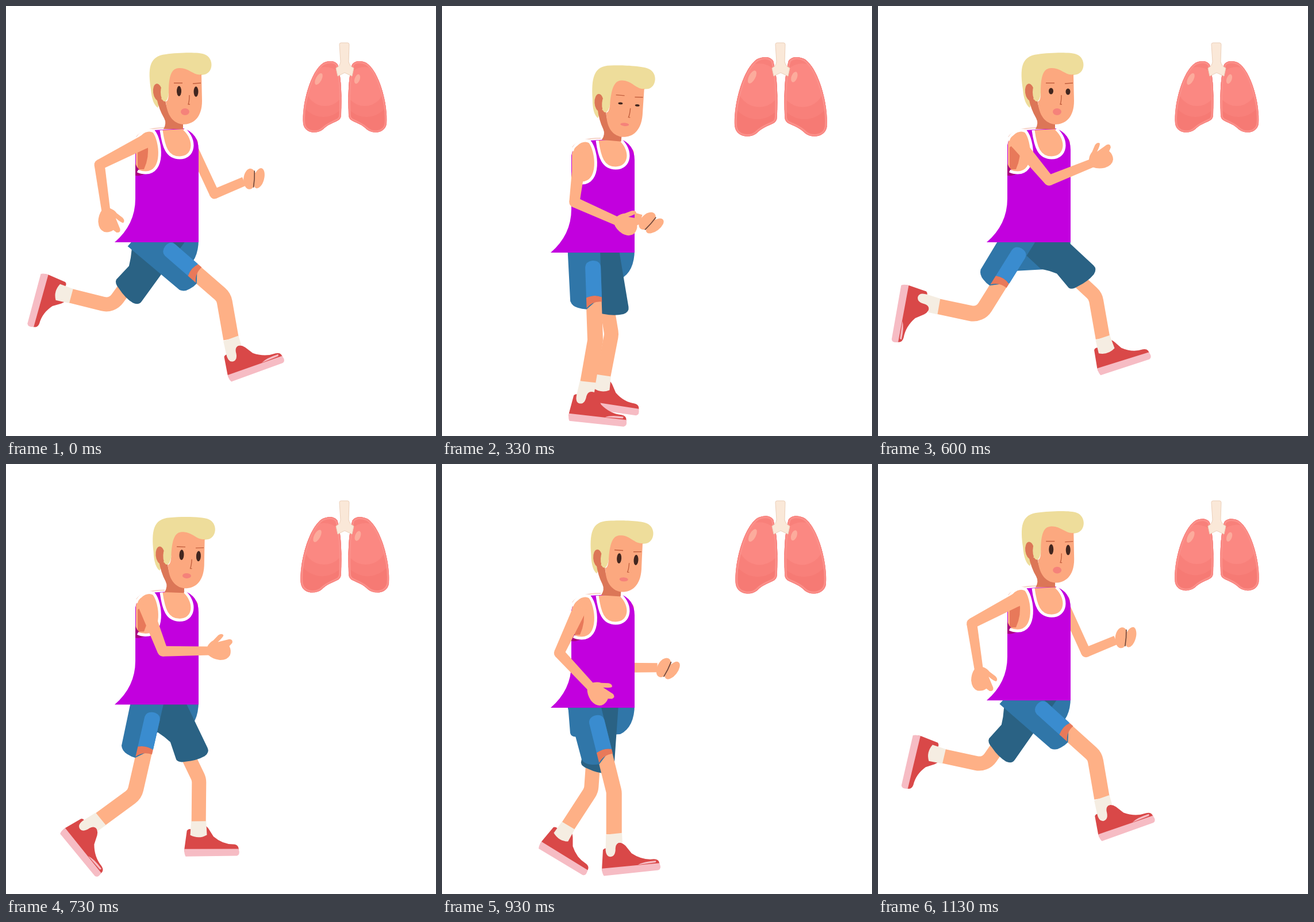
Recreate the animation shown at these times as an HTML page with a canvas. Size 748x748 px, loop 1.19 s.

```html
<!DOCTYPE html>
<html lang="en">
<head>
<meta charset="utf-8">
<title>Runner and lungs</title>
<style>
html, body { margin: 0; width: 100%; height: 100%; overflow: hidden; background: #fff; }
canvas { display: block; width: 100vw; height: 100vh; }
</style>
</head>
<body>
<canvas id="stage" width="748" height="748"></canvas>
<script>
const ctx = document.getElementById('stage').getContext('2d');
const LOOP = 1190, STEPS = 18, RAD = Math.PI / 180;

const C = {
  skin: '#feb086', face: '#fca87f', shade: '#dc7657', inner: '#e8795a', hair: '#eedd9b',
  shirt: '#c200de', fold: '#a8007f', mid: '#3076a8', light: '#3a8ccf', dark: '#2a6284',
  shoe: '#d94848', sole: '#f6bcc4', sock: '#f5ede2', eye: '#41261f', brow: '#c2603f',
  lip: '#f5827a', lung: '#fb8882', lungLow: '#f67a74', rim: '#fb908a', shine: '#fcab9c',
  pipe: '#fae8d8', pipeEdge: '#ecd0ba'
};

// Stride position: 0 = near leg fully forward, 9 = fully back.
const strideAt = [[0, 0], [9, 9], [11, 6.75], [14, 3.86], [17, 0.1], [18, 0]];
const eyeAt = [[0, 9], [2, 6], [4, 2], [7, 1.5], [9, 5.5], [11, 9], [18, 9]];

// Angles in degrees from straight down, positive towards the front.
const KEYS = [0, 2, 3.86, 5, 7, 9];
const POSE = {
  bob: [0, 5, 13, 18, 6, 0],
  near: {
    thigh: [49, 30, 14, 2, -15, -32],
    reach: [156, 159, 158, 160, 168, 158],
    shin: [10, 4, 0, -10, -60, -102],
    foot: [-20, -11.5, -6, 6, 57, 100],
    arm: [-63, -47, -25, -7, 25, 40],
    fore: [8, 21, 43, 66, 94, 112]
  },
  far: {
    thigh: [-36, -15.5, -4, 9.5, 28, 47],
    reach: [146, 145, 151, 151, 152, 148],
    shin: [-104, -66, -33, -11, 1, 10],
    foot: [105, 63, 31, 8, -2, -18],
    arm: [25, 14, -2, -18, -36, -60],
    fore: [113, 100, 90, 75, 24, 8]
  }
};

const shape = d => new Path2D(d);
const S = {
  shoe: shape('M-22 25Q-18 20-10 25L3 16Q11 13 18 22L27 36Q44 50 64 50Q75 51 73 62H-27V56Z'),
  sole: shape('M-27 57L73 58Q77 68 70 70H-25Q-28 65-27 57Z'),
  gloss: shape('M36 57Q46 52 68 53L67 56Z'),
  sockNear: shape('M-14-1H14L13 16Q2 13 0 24Q-1 38-10 38Q-19 37-17 22Z'),
  sockFar: shape('M-13-1H13L14 23Q0 31-15 23Z'),
  shortsNear: shape('M-43-28L-41 90Q-38 99-28 102Q-20 105-13 105L14 83V-28Z'),
  strip: shape('M-13 85V32Q-12 22 0 21Q13 21 14 32V85Q2 79-13 85Z'),
  cuff: shape('M-13 85Q2 79 14 85V93Q-2 91-13 103Z'),
  shortsFar: shape('M-30-25L-30 46Q-22 59-17 72L-21 104Q-20 111-8 114Q10 121 26 120Q37 118 37 109V-25Z'),
  torso: shape('M225 300V242Q230 216 256 216L309 213Q335 222 335 250V411H189Q225 380 225 335Z'),
  armhole: shape('M226 290V240C230 216 250 212 258 218C270 236 273 290 243 290Z'),
  armEdge: shape('M227 234C234 217 248 213 257 218C270 234 276 290 243 290Q235 290 229 287'),
  armShade: shape('M229 284V246Q238 238 246 238Q250 262 240 284Z'),
  fold: shape('M225 274Q230 288 243 291Q236 296 225 295Z'),
  neckline: shape('M270 216C274 245 280 264 302 264C327 264 332 234 310 214'),
  shoulder: shape('M227 228Q238 212 276 212'),
  hair: shape('M252 145C247 110 248 87 278 84C300 81 335 80 345 84C362 90 361 115 346 119C335 121 330 122 320 125L283 150L277 166H268L264 177Q254 170 252 145Z'),
  jaw: shape('M262 160L277 164Q282 194 300 204H308V214H274Q280 204 275 195Q266 180 262 160Z'),
  face: shape('M283 150C283 112 292 108 303 108C318 108 328 122 340 119L341 165C341 195 325 206 308 206C290 204 280 190 278 166Q283 166 283 150Z'),
  brows: shape('M292 134H307M325 135L339 134'),
  nose: shape('M319 155Q319 166 317 171L320 171'),
  hand: shape('M-4-8Q0-15 6-18L15-27Q21-31 24-27Q24-24 14-15L34-20Q41-20 39-13L34-8Q38 0 35 8Q30 17 16 16Q4 14-3 7Z'),
  lobe: shape('M577 102C572 94 560 95 552 99C530 113 514 172 517 205C520 222 541 223 551 215C560 206 568 204 576 200Q583 197 583 189C584 160 584 128 577 102Z'),
  pipe: shape('M580 67Q580 64 583 64H594Q597 64 597 67L596 97Q598 105 605 108L602 122L589 116L577 122L574 108Q581 105 582 97Z')
};

function track(keys, x) {
  let i = 1;
  while (i < keys.length - 1 && keys[i][0] < x) i++;
  const [x0, y0] = keys[i - 1], [x1, y1] = keys[i];
  return y0 + (y1 - y0) * (x - x0) / (x1 - x0);
}

const posed = (values, u) => track(values.map((v, i) => [KEYS[i], v]), u);

function limbPose(keys, u) {
  const out = {};
  for (const name in keys) out[name] = posed(keys[name], u);
  return out;
}

const along = ([x, y], deg, len) => [x + Math.sin(deg * RAD) * len, y + Math.cos(deg * RAD) * len];

function fill(path, color) {
  ctx.fillStyle = color;
  ctx.fill(path);
}

function line(path, color, width) {
  ctx.strokeStyle = color;
  ctx.lineWidth = width;
  ctx.stroke(path);
}

function oval(x, y, rx, ry, color, deg = 0) {
  ctx.fillStyle = color;
  ctx.beginPath();
  ctx.ellipse(x, y, rx, ry, deg * RAD, 0, Math.PI * 2);
  ctx.fill();
}

function inFrame(x, y, deg, draw) {
  ctx.save();
  ctx.translate(x, y);
  ctx.rotate(deg * RAD);
  draw();
  ctx.restore();
}

// Tapered limb segment with a round start.
function segment([x0, y0], [x1, y1], w0, w1) {
  const len = Math.hypot(x1 - x0, y1 - y0);
  inFrame(x0, y0, Math.atan2(y1 - y0, x1 - x0) / RAD, () => {
    oval(0, 0, w0 / 2, w0 / 2, C.skin);
    ctx.beginPath();
    ctx.moveTo(0, -w0 / 2);
    ctx.lineTo(len, -w1 / 2);
    ctx.lineTo(len, w1 / 2);
    ctx.lineTo(0, w0 / 2);
    ctx.fill();
  });
}

function foot([x, y], deg, near) {
  inFrame(x, y, deg, () => {
    ctx.save();
    if (!near) {
      ctx.translate(0, -10);
      ctx.scale(0.94, 1);
    }
    fill(S.shoe, C.shoe);
    fill(S.sole, C.sole);
    if (near) fill(S.gloss, C.sole);
    ctx.restore();
    fill(near ? S.sockNear : S.sockFar, C.sock);
  });
}

function leg(hip, p, near) {
  const knee = along(hip, p.thigh, p.reach);
  const ankle = along(knee, p.shin, 74);
  const start = along(hip, p.thigh, 75);
  ctx.strokeStyle = C.skin;
  ctx.lineWidth = near ? 27 : 25;
  ctx.lineJoin = 'round';
  ctx.beginPath();
  ctx.moveTo(...start);
  ctx.arcTo(...knee, ...ankle, 24);
  ctx.lineTo(...ankle);
  ctx.stroke();
  foot(ankle, p.foot, near);
  inFrame(...hip, -p.thigh, () => {
    if (!near) return fill(S.shortsFar, C.dark);
    fill(S.shortsNear, C.mid);
    fill(S.strip, C.light);
    fill(S.cuff, C.inner);
  });
}

function pelvis(b) {
  inFrame(0, 411 + b, 0, () =>
    fill(shape('M219-6L223 44Q225 52 236 50L310 46Q335 34 335-6Z'), C.mid));
}

function farArm(b, p) {
  const shoulder = [322, 240 + 1.4 * b];
  const elbow = along(shoulder, p.arm, 96);
  const wrist = along(elbow, p.fore, 56);
  oval(324, 238 + b, 10, 10, C.skin);
  segment(shoulder, elbow, 17, 17);
  segment(elbow, wrist, 17, 16);
  inFrame(...wrist, 90 - p.fore, () => {
    oval(11, 0, 18, 11, C.skin, -62);
    oval(26, 5, 18, 9, C.skin, -52);
    line(shape('M24-10Q19 3 11 16'), '#6b4439', 1.6);
  });
}

function nearArm(b, p) {
  const shoulder = [241, 236 + b];
  const elbow = along(shoulder, p.arm, 88);
  const wrist = along(elbow, p.fore, 82);
  segment(shoulder, elbow, 24, 18);
  segment(elbow, wrist, 18, 15);
  inFrame(...wrist, 90 - p.fore, () => fill(S.hand, C.skin));
}

function torso(b) {
  inFrame(0, b, 0, () => {
    line(S.shoulder, '#f6d3c8', 2);
    fill(S.torso, C.shirt);
    fill(S.neckline, C.skin);
    line(S.neckline, '#fff', 5);
    fill(S.armhole, C.skin);
    fill(S.armShade, C.inner);
    fill(S.fold, C.fold);
    line(S.armEdge, '#fff', 5);
  });
}

function head(k, eye) {
  inFrame(300 + 4 * k, 210 + 21 * k, 5 * k, () => {
    ctx.translate(-300, -210);
    fill(S.hair, C.hair);
    fill(S.jaw, C.shade);
    oval(264, 150, 8, 15, C.shade, -8);
    oval(276, 150, 7, 16, C.hair);
    fill(S.face, C.face);
    line(S.brows, C.brow, 1.4);
    line(S.nose, C.brow, 1.4);
    oval(301, 148, 4, eye, C.eye);
    oval(330.5, 149, 4, eye, C.eye);
    oval(311.5, 184, 7.5, 6 - 3.2 * k, C.lip);
  });
}

function lobe(side, scale) {
  ctx.save();
  if (side > 0) {
    ctx.translate(1179, 0);
    ctx.scale(-1, 1);
  }
  ctx.translate(584, 158);
  ctx.scale(scale, scale);
  ctx.translate(-584, -158);
  ctx.clip(S.lobe);
  fill(S.lobe, C.lungLow);
  oval(552, 140, 46, 53, '#f8807a');
  oval(555, 140, 34, 34, C.lung);
  line(S.lobe, C.rim, 7);
  line(S.lobe, '#f77f7b', 2);
  if (side > 0) oval(568, 127, 4.5, 8.5, C.shine, -20);
  else oval(544, 127, 5, 11, C.shine, 28);
  ctx.restore();
}

function lungs(scale) {
  lobe(-1, scale);
  lobe(1, scale);
  fill(S.pipe, C.pipe);
  line(S.pipe, C.pipeEdge, 1);
}

function draw(step) {
  const u = track(strideAt, step);
  const b = posed(POSE.bob, u);
  const near = limbPose(POSE.near, u), far = limbPose(POSE.far, u);
  const low = b / 18;
  ctx.fillStyle = '#fff';
  ctx.fillRect(0, 0, 748, 748);
  lungs(1 + 0.113 * low ** 0.7);
  farArm(b, far);
  pelvis(b);
  leg([270, 404 + b], far, false);
  leg([261, 404 + b], near, true);
  torso(b);
  head(low ** 0.85, track(eyeAt, step));
  nearArm(b, near);
}

// Steps fall on the nearest 10 ms of a 15 per second beat.
const startOf = step => Math.round(step * 20 / 3) * 10;

function tick() {
  const t = performance.now() % LOOP;
  let step = STEPS - 1;
  while (startOf(step) > t) step--;
  draw(step);
  requestAnimationFrame(tick);
}
tick();
</script>
</body>
</html>
```
